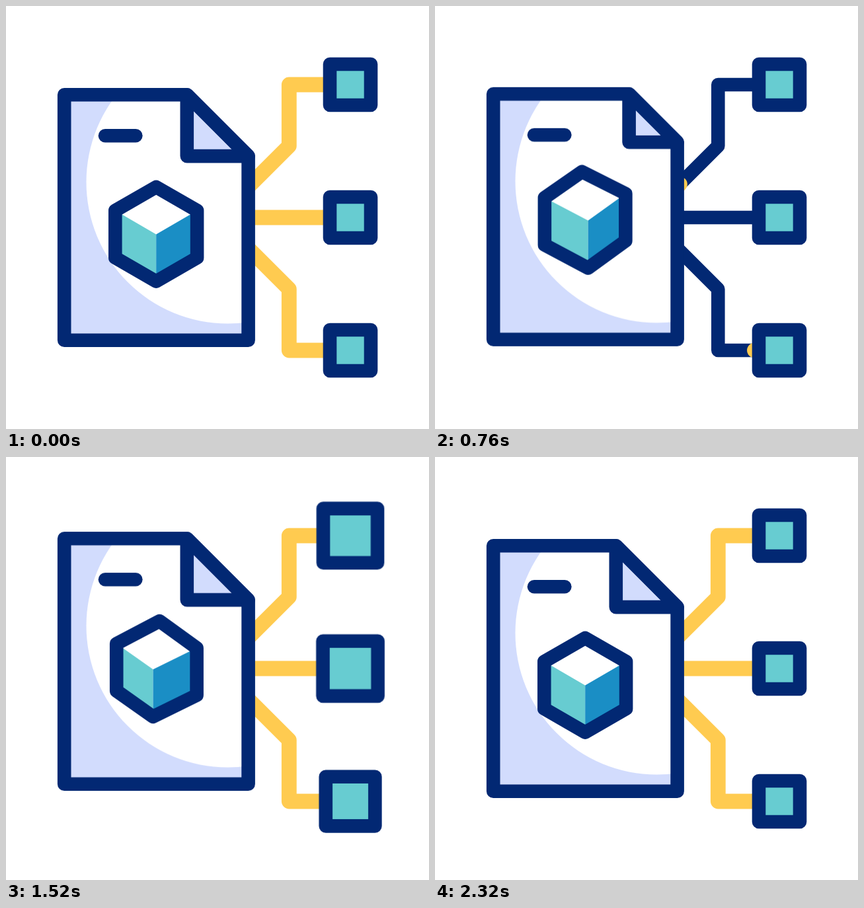
Recreate the animation shown at these times as an HTML page. Size 640 by 640 pixels, loop 2360 ms.

```html
<!DOCTYPE html>
<html lang="en">
<head>
<meta charset="utf-8">
<title>Model file with linked nodes</title>
<style>
  html, body { margin: 0; width: 100%; height: 100%; overflow: hidden; background: #fff; }
  svg { display: block; width: 100%; height: 100%; }

  .ink { stroke: #022873; stroke-width: 20.6; stroke-linecap: round; stroke-linejoin: round; }
  .line { fill: none; stroke-linejoin: round; }
  .flow { stroke: #ffcb50; stroke-width: 22.8; stroke-linecap: round; stroke-dasharray: 1 1; }
  .node { fill: #67ccd1; transform-box: fill-box; transform-origin: center; vector-effect: non-scaling-stroke; }

  .flow, .node, #doc {
    animation: 2360ms cubic-bezier(.3333, 0, .6667, 1) infinite;
  }
  #doc { animation-name: rise; }
  .flow.top { animation-name: flow-top; }
  .flow.mid { animation-name: flow-mid; }
  .flow.low { animation-name: flow-low; }
  .node { animation-name: pop; --size: 1.403; }
  .node.top { --size: 1.324; }
  .node.mid { animation-delay: 120ms; }
  .node.low { animation-delay: 240ms; }

  @keyframes rise {
    0%, 27.97% { transform: translateY(0); }
    54.24% { transform: translateY(-16.9px); }
    79.66%, 100% { transform: translateY(0); }
  }
  @keyframes pop {
    0%, 44.07% { transform: scale(1); }
    64.41% { transform: scale(var(--size)); }
    85.4%, 100% { transform: scale(1); }
  }
  /* the dash runs out at the node, then enters again from the page */
  @keyframes flow-top {
    0% { stroke-dashoffset: 0; }
    23.73%, 30.25% { stroke-dashoffset: -1; }
    53.98%, 100% { stroke-dashoffset: -2; }
  }
  @keyframes flow-mid {
    0%, 5.3% { stroke-dashoffset: 0; }
    29.03%, 36.44% { stroke-dashoffset: -1; }
    60.17%, 100% { stroke-dashoffset: -2; }
  }
  @keyframes flow-low {
    0%, 10.85% { stroke-dashoffset: 0; }
    34.58%, 39.83% { stroke-dashoffset: -1; }
    63.56%, 100% { stroke-dashoffset: -2; }
  }
</style>
</head>
<body>
<svg viewBox="0 0 640 640">
  <defs>
    <path id="top" d="M367 273 428.3 211.7V119H490"/>
    <path id="mid" d="M367 320H490"/>
    <path id="low" d="M367 367 428.3 428.3V521H490"/>
    <clipPath id="page"><path id="pageClip"/></clipPath>
  </defs>

  <g class="line ink" style="stroke-linecap:butt">
    <path d="M367 273 428.3 211.7V119H490"/>
    <path d="M367 320H490"/>
    <path d="M367 367 428.3 428.3V521H490"/>
  </g>
  <path class="line flow top" pathLength="1" d="M367 273 428.3 211.7V119H490"/>
  <path class="line flow mid" pathLength="1" d="M367 320H490"/>
  <path class="line flow low" pathLength="1" d="M367 367 428.3 428.3V521H490"/>

  <rect class="node ink top" x="490" y="88" width="62" height="62"/>
  <rect class="node ink mid" x="490" y="289" width="62" height="62"/>
  <rect class="node ink low" x="490" y="490" width="62" height="62"/>

  <g id="doc">
    <g clip-path="url(#page)">
      <rect x="88" y="134" width="279" height="372" fill="#d2dcfd"/>
      <circle cx="335.5" cy="266.5" r="214" fill="#fff"/>
    </g>
    <path id="fold" class="ink" fill="#d2dcfd"/>
    <path id="outline" class="ink" fill="none"/>
    <path class="ink" d="M150 196.3H196.3"/>
    <path id="lid" fill="#fff"/>
    <path id="left" fill="#67ccd1"/>
    <path id="right" fill="#1a8ec5"/>
    <path id="hull" class="ink" fill="none"/>
  </g>
</svg>
<script>
  const LOOP = 2360;
  const put = (id, d) => document.getElementById(id).setAttribute('d', d);
  const poly = (...pts) => 'M' + pts.map(p => p.map(n => n.toFixed(2)).join(' ')).join('L') + 'Z';

  // eased value between [time, value] keys
  function track(t, keys) {
    if (t <= keys[0][0]) return keys[0][1];
    for (let i = 1; i < keys.length; i++) {
      const [t0, v0] = keys[i - 1], [t1, v1] = keys[i];
      if (t < t1) {
        const u = (t - t0) / (t1 - t0);
        return v0 + (v1 - v0) * u * u * (3 - 2 * u);
      }
    }
    return keys[keys.length - 1][1];
  }

  function drawPage(t) {
    const size = 92.8 - track(t, [[0, 0], [760, 19.8], [1500, 0]]);
    const l = 88.2, r = 366.6, top = 134.3, bottom = 505.7;
    const x = r - size, y = top + size;
    const page = poly([l, top], [x, top], [r, y], [r, bottom], [l, bottom]);
    put('outline', page);
    put('pageClip', page);
    put('fold', poly([x, top], [x, y], [r, y]));
  }

  function drawCube(t) {
    const lift = track(t, [[100, 0], [1100, 1], [1930, 0]]);
    const sway = track(t, [[0, 0], [560, 7.2], [1300, -8.3], [1780, 0]]);
    const at = (x, y) => [227.2 + x, 345.2 - 28 * lift + y];
    const half = 71.4 + 2 * lift;
    const lx = -61.9 + 2 * lift - 0.2 * sway, rx = 61.9 - lift;
    const tilt = 0.7 * sway, drop = -0.18 * sway;

    const back = at(-1.1 * sway, -half), front = at(sway, 0.4 + lift), base = at(sway, half);
    const tl = at(lx, -35.7 + drop + tilt), bl = at(lx, 35.7 + drop + tilt);
    const tr = at(rx, -35.7 + drop - tilt), br = at(rx, 35.7 + drop - tilt);
    put('lid', poly(back, tr, front, tl));
    put('left', poly(tl, front, base, bl));
    put('right', poly(front, tr, br, base));
    put('hull', poly(back, tr, br, base, bl, tl));
  }

  function draw(t) {
    drawPage(t);
    drawCube(t);
  }

  let start;
  function tick(now) {
    start ??= now;
    draw((now - start) % LOOP);
    requestAnimationFrame(tick);
  }
  draw(0);
  requestAnimationFrame(tick);
</script>
</body>
</html>
```
